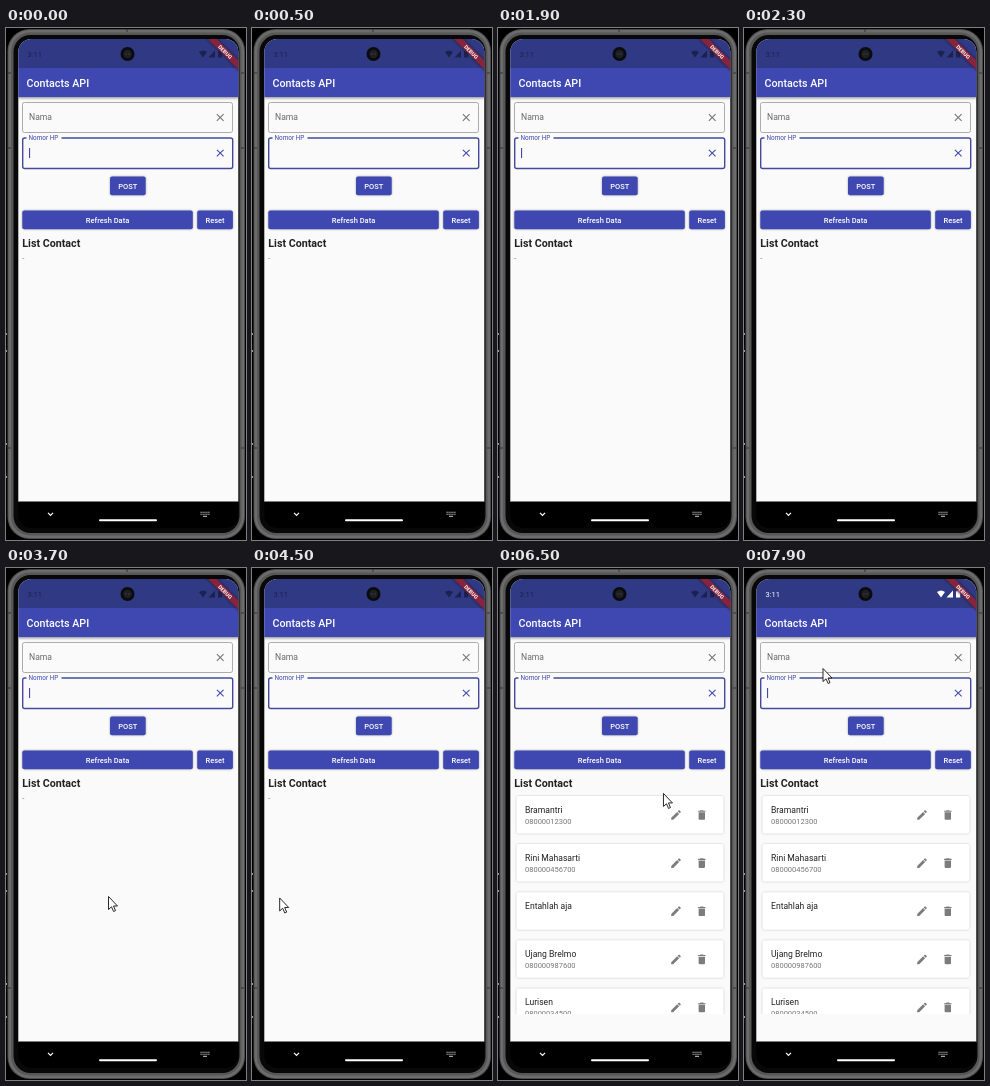
Write an HTML page that moves like this. It is 240 by 512 pixels and loops after 8 s.

```html
<!DOCTYPE html>
<html lang="id">
<head>
<meta charset="utf-8">
<title>Contacts API</title>
<style>
html, body { margin: 0; width: 100%; height: 100%; overflow: hidden; background: #000; }
svg { display: block; width: 100vw; height: 100vh; font-family: Roboto, "Noto Sans", sans-serif; }
.button rect { fill: #3f48b0; filter: drop-shadow(0 .7px .8px #0005); }
.button text { font-size: 7.5px; font-weight: 500; fill: #fff; text-anchor: middle; }
.card rect { fill: #fff; filter: drop-shadow(0 .6px .9px #0003); }
.name { font-size: 8.6px; fill: #222; }
.phone { font-size: 7.5px; fill: #757575; }
</style>
</head>
<body>
<svg viewBox="0 0 240 512">
  <defs>
    <path id="clear" d="M19 6.41 17.59 5 12 10.59 6.41 5 5 6.41 10.59 12 5 17.59 6.41 19 12 13.41 17.59 19 19 17.59 13.41 12z"/>
    <path id="edit" d="M3 17.25V21h3.75L17.81 9.94l-3.75-3.75zM20.71 7.04a1 1 0 0 0 0-1.41l-2.34-2.34a1 1 0 0 0-1.41 0l-1.83 1.83 3.75 3.75z"/>
    <path id="trash" d="M6 19c0 1.1.9 2 2 2h8c1.1 0 2-.9 2-2V7H6zM19 4h-3.5l-1-1h-5l-1 1H5v2h14z"/>
    <clipPath id="screen"><rect x="12.3" y="11" width="220" height="489" rx="13"/></clipPath>
    <clipPath id="listArea"><rect x="12" y="222" width="221" height="224"/></clipPath>
  </defs>

  <!-- phone body -->
  <rect width="240" height="512"/>
  <path d="M0 305h1v2H0zM0 322h1v2H0zM0 415h1v2H0zM0 448h1v2H0z" fill="#999"/>
  <rect x="1.5" y="1" width="237.500" height="510" rx="22" fill="#4c4c4c"/>
  <rect x="2.500" y="2" width="235.500" height="508" rx="21" fill="#6c6c6c"/>
  <rect x="5" y="4.500" width="230.500" height="503" rx="18.500" fill="#575757"/>
  <rect x="7.500" y="7" width="226" height="498" rx="17" fill="#080808"/>
  <path d="M2 45h3M2 120h3M2 420h3M235 45h3M235 120h3M235 420h3M121 1v3" stroke="#333"/>

  <g clip-path="url(#screen)">
    <rect x="12" y="11" width="221" height="463" fill="#fafafa"/>
    <rect x="12" y="40" width="221" height="29" fill="#3f48b0" style="filter:drop-shadow(0 1px 1.5px #0007)"/>
    <rect x="12" y="11" width="221" height="29" fill="#303984"/>
    <g id="status">
      <text x="21.500" y="29" font-size="7.500">3:11</text>
      <path d="M193 24q4-3 8 0l-4 5.500zM202.500 29.500h6.500v-7zM212 23.300h1.200v-.8h1.800v.8h1.200v6.200h-4.200z"/>
    </g>
    <circle cx="121.500" cy="26" r="7" fill="#0b0b0e"/>
    <circle cx="121.500" cy="26" r="4.200" fill="#1c1f24"/>
    <path d="M119.500 26h1m2 0h1" stroke="#555"/>
    <g transform="translate(232 11) rotate(45)">
      <rect x="-24" y="15" width="48" height="6.400" fill="#86243d" style="filter:drop-shadow(0 0 1.500px #000a)"/>
      <text y="20.200" font-size="5.400" font-weight="900" fill="#f0e4e8" text-anchor="middle">DEBUG</text>
    </g>
    <text x="20.500" y="58.500" font-size="10.700" font-weight="500" fill="#fff">Contacts API</text>

    <!-- form -->
    <rect x="16.500" y="74.500" width="210" height="30" rx="2" fill="none" stroke="#999" stroke-width=".8"/>
    <text x="23" y="92" font-size="8.600" fill="#6b6b6b">Nama</text>
    <path d="M20.500 110H18.700a2 2 0 0 0-2 2v26.500a2 2 0 0 0 2 2H224.700a2 2 0 0 0 2-2V112a2 2 0 0 0-2-2H55.500" fill="none" stroke="#434a9c" stroke-width="1.400"/>
    <text x="22.500" y="112" font-size="6.400" fill="#3f48b0">Nomor HP</text>
    <rect id="caret" x="23" y="120" width="1.100" height="10" fill="#3f48b0"/>
    <use href="#clear" transform="translate(207.800 83.100) scale(.535)" fill="#757575"/>
    <use href="#clear" transform="translate(207.800 118.700) scale(.535)" fill="#3f48b0"/>
    <g id="buttons"></g>
    <text x="16.300" y="219" font-size="10.700" font-weight="700" fill="#212121">List Contact</text>
    <text id="empty" x="16.300" y="232.500" font-size="7.500" fill="#777">-</text>
    <g id="list" clip-path="url(#listArea)"></g>

    <!-- navigation bar -->
    <rect x="12" y="473.500" width="221" height="27"/>
    <path d="M42 484.800l2.500 2.500 2.500-2.500" fill="none" stroke="#fff" stroke-width="1.200"/>
    <rect x="93" y="491.300" width="58" height="2" rx="1" fill="#fff"/>
    <path d="M194.500 484.300h9m-9 2h9" stroke="#ccc" stroke-width="1.100" stroke-dasharray="1.200 .750"/>
    <path d="M197 488.300h4" stroke="#ccc"/>
  </g>
  <path id="mouse" d="M.5.5V13.500L3.500 10.800 5.600 15.500 7.500 14.600 5.500 10H9.500z" fill="#fff" stroke="#111" stroke-width=".9" stroke-linejoin="round"/>
</svg>
<script>
const $ = id => document.getElementById(id);
const LOOP = 8000, LIST_AT = 6200, STATUS_AT = 6900;

const button = (x, y, w, label) => `<g class="button">
  <rect x="${x}" y="${y}" width="${w}" height="18.700" rx="2"/>
  <text x="${x + w / 2}" y="${y + 12}">${label}</text></g>`;
$("buttons").innerHTML = button(104, 148.5, 35.7, "POST")
  + button(16.3, 182.5, 170.5, "Refresh Data") + button(191.2, 182.5, 35.7, "Reset");

const contacts = [
  ["Bramantri", "08000012300"],
  ["Rini Mahasarti", "080000456700"],
  ["Entahlah aja", ""],
  ["Ujang Brelmo", "080000987600"],
  ["Lurisen", "08000034500"]
];
const icon = (id, x) => `<use href="#${id}" transform="translate(${x} 12.6) scale(.535)" fill="#7c7c7c"/>`;
$("list").innerHTML = contacts.map(([name, phone], i) => `<g class="card" transform="translate(0 ${228 + i * 48.1})">
  <rect x="18.500" width="207" height="37.500" rx="2"/>
  <text class="name" x="27" y="16.500">${name}</text>
  <text class="phone" x="27" y="27.500">${phone}</text>
  ${icon("edit", 171.6)}${icon("trash", 197.4)}</g>`).join("");

// Caret switches at each of these times, starting visible.
const blinks = [400, 900, 1400, 1800, 2300, 2800, 3300, 3700, 4300, 4800, 5300, 5800, 6300, 6800, 7200, 7700];

// Pointer visits: [time, x, y]; hidden between visits.
const visits = [
  [[1000, 140, 188], [1200, 125, 153], [1800, 125, 153]],
  [[3700, 102, 328], [4000, 102, 328], [4400, 27, 329], [4500, 27, 329], [4800, 81, 473], [4900, 164, 400],
   [5500, 164, 400], [5800, 168, 294], [6100, 168, 294], [6500, 165, 225], [6800, 152, 206], [7100, 152, 206],
   [7200, 142, 195], [7400, 142, 195], [7900, 78.5, 100], [8000, 78.5, 100]]
];

function pointerAt(t) {
  const path = visits.find(v => t >= v[0][0] && t < v.at(-1)[0]);
  if (!path) return null;
  const i = path.findIndex(p => p[0] > t);
  const [t0, x0, y0] = path[i - 1], [t1, x1, y1] = path[i];
  const k = (t - t0) / (t1 - t0);
  return [x0 + (x1 - x0) * k, y0 + (y1 - y0) * k];
}

const show = (id, on) => $(id).setAttribute("visibility", on ? "visible" : "hidden");

function draw(now) {
  const t = now % LOOP;
  const pos = pointerAt(t);
  show("mouse", pos);
  if (pos) $("mouse").setAttribute("transform", `translate(${pos})`);
  show("caret", blinks.filter(b => b <= t).length % 2 === 0);
  show("list", t >= LIST_AT);
  show("empty", t < LIST_AT);
  $("status").setAttribute("fill", t >= STATUS_AT ? "#fff" : "#1c2250");
  requestAnimationFrame(draw);
}
draw(performance.now());
</script>
</body>
</html>
```
